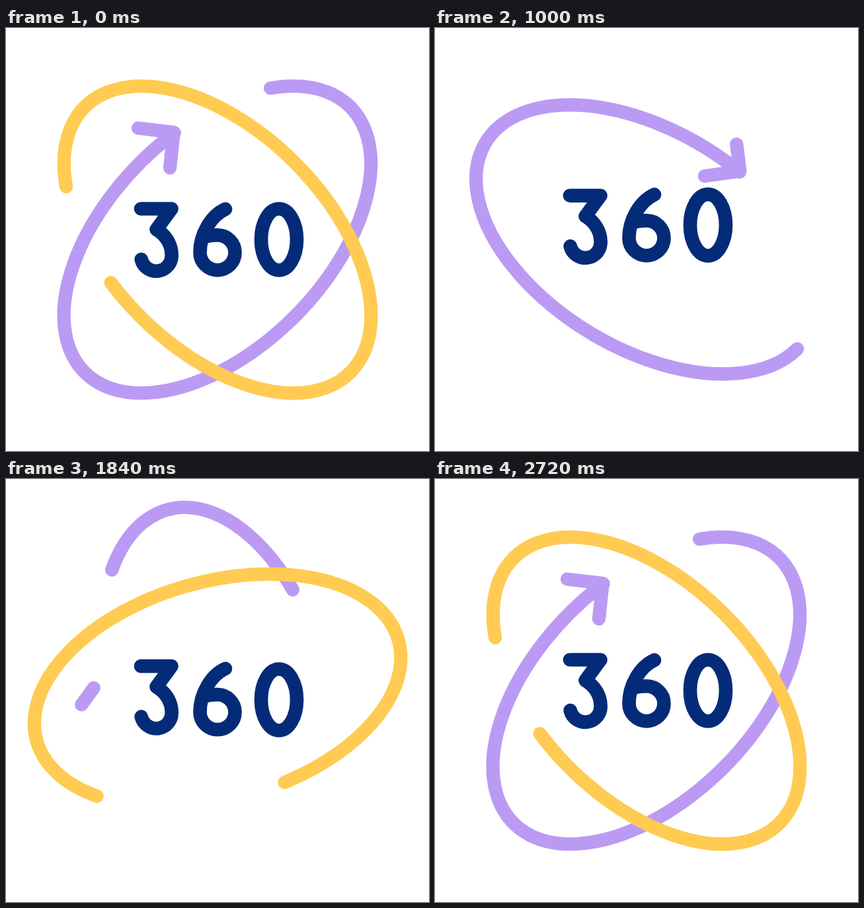
Recreate the animation shown at these times as an HTML page. Size 640 px wide and 640 px high, loop 2.76 s.

```html
<!DOCTYPE html>
<html lang="en">
<head>
<meta charset="utf-8">
<title>360</title>
<style>
  html, body { margin: 0; width: 100%; height: 100%; overflow: hidden; background: #fff; }
  svg { display: block; width: 100vw; height: 100vh; }
  path, ellipse { fill: none; stroke-width: 20.3; stroke-linecap: round; stroke-linejoin: round; }
  .digit { stroke: #032b77; stroke-width: 20.7; }
  .violet { stroke: #bb9af4; }
  .amber { stroke: #ffcb52; }
</style>
</head>
<body>
<svg viewBox="0 0 640 640">
  <path class="digit" d="M204 273.5H250.5L227.5 304.8C240 312 250.6 326 250.6 343A23.3 23.3 0 0 1 204.7 350"/>
  <path class="digit" d="M332 274C310 284 293.5 312 293.5 339.8A26.5 26.5 0 1 0 320 313.3C310 313.3 303 314.5 297 317.5"/>
  <ellipse class="digit" cx="413" cy="320" rx="27" ry="46.5"/>
  <g id="spin">
    <path id="violetArc" class="violet" transform="translate(320 320) rotate(-45)"/>
    <path id="head" class="violet" d="M200 151.5L253.7 157.8L248 211.5"/>
    <path id="amberArc" class="amber" transform="translate(320 320) rotate(225)"/>
  </g>
</svg>
<script>
const LOOP = 2760, STEP = 40;
const $ = id => document.getElementById(id);
const spin = $("spin"), violetArc = $("violetArc"), head = $("head"), amberArc = $("amberArc");
const digits = [...document.querySelectorAll(".digit")];

// Both orbits share one open ellipse
const orbit = "M218.5 -105.3A284 165 0 1 1 68 -160.2";
violetArc.setAttribute("d", orbit);
amberArc.setAttribute("d", orbit);
const lengths = new Map([violetArc, head, amberArc].map(p => [p, p.getTotalLength()]));

const clamp = x => Math.min(1, Math.max(0, x));
const span = (t, from, to) => clamp((t - from) / (to - from));
const sine = x => (1 - Math.cos(Math.PI * x)) / 2;

// Symmetric cubic bezier (p, 0, 1 - p, 1)
function bezier(x, p) {
  let lo = 0, hi = 1;
  for (let i = 0; i < 30; i++) {
    const s = (lo + hi) / 2, q = 1 - s;
    const bx = 3 * q * q * s * p + 3 * q * s * s * (1 - p) + s * s * s;
    if (bx < x) lo = s; else hi = s;
  }
  return lo * lo * (3 - 2 * lo);
}

function trim(path, [from, to]) {
  const len = lengths.get(path), visible = (to - from) * len;
  path.style.display = visible < 0.1 ? "none" : "";
  path.style.strokeDasharray = to - from > 0.9999 ? "none" : `${visible} ${len * 2}`;
  path.style.strokeDashoffset = -from * len;
}

// Erase from the tail, then draw again from the tail
function sweep(t, hideAt, showAt) {
  if (t < showAt) return [span(t, hideAt, hideAt + 750) ** 2, 1];
  return [0, 1 - (1 - span(t, showAt, showAt + 900)) ** 1.8];
}

function bob(t) {
  if (t < 850) return -22 * sine(span(t, 100, 745));
  if (t < 1570) return -22 + 36 * sine(span(t, 850, 1570));
  return 14 - 14 * sine(span(t, 1570, 2180));
}

function draw(time) {
  const t = Math.max(0, Math.floor((time % LOOP) / STEP) * STEP - STEP);
  const angle = 360 * bezier(span(t, 50, 2630), 0.555);
  spin.setAttribute("transform", `rotate(${angle} 320 320)`);
  const violet = sweep(t, 700, 1644);
  trim(violetArc, violet);
  trim(head, violet);
  trim(amberArc, sweep(t, 85, 1153));
  digits.forEach((d, i) => d.setAttribute("transform", `translate(0 ${bob(t - 120 * i)})`));
}

const begin = performance.now();
function tick() {
  draw(performance.now() - begin);
  requestAnimationFrame(tick);
}
tick();
</script>
</body>
</html>
```
